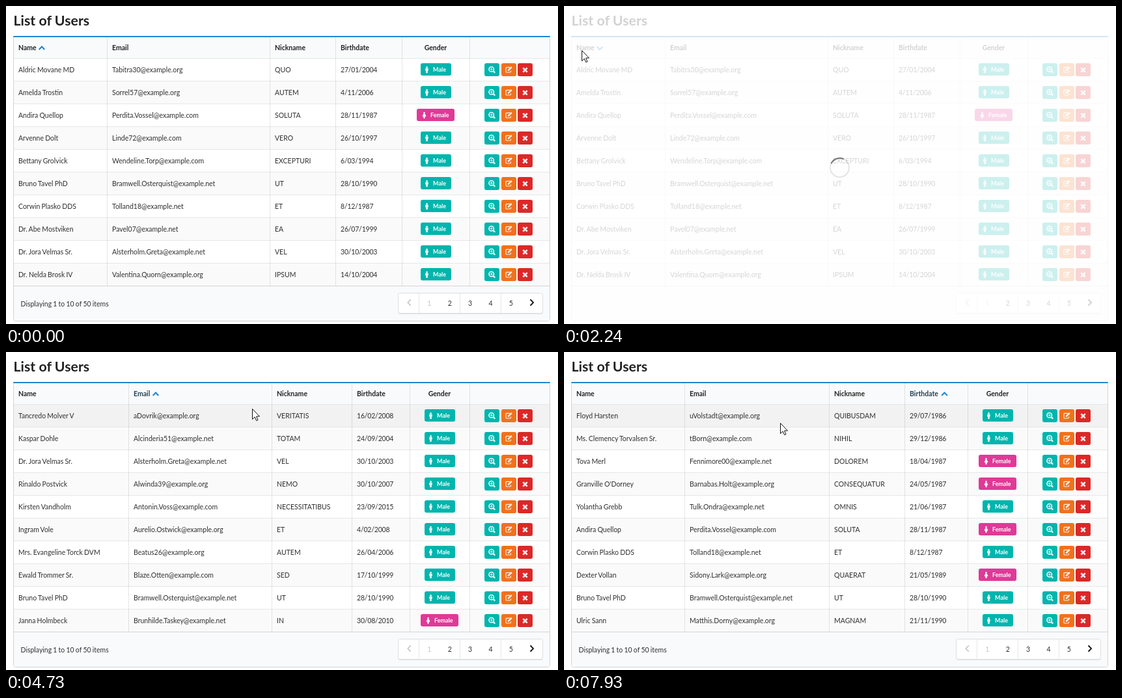
An HTML page that plays this animation: 848x489 px, repeating every 8000 ms.

```html
<!DOCTYPE html>
<html lang="en">
<head>
<meta charset="utf-8">
<title>List of Users</title>
<style>
html, body { margin: 0; width: 100%; height: 100%; overflow: hidden; background: #fff; }
svg { display: block; }
text { font: 10.5px Lato, sans-serif; fill: #303030; word-spacing: -.5px; }
.b { font-weight: 700; fill: #222; }
.title { font-size: 21.3px; font-weight: 700; fill: #222; word-spacing: 0; }
.tag { font-size: 9px; font-weight: 700; fill: #fff; }
.date { letter-spacing: -.2px; }
.mid { text-anchor: middle; }
.line { fill: #222426; fill-opacity: .11; }
.icon { fill: none; stroke: #fff; stroke-opacity: .9; }
.body { fill: #fff; fill-opacity: .95; }
</style>
</head>
<body>
<svg width="848" height="489" viewBox="0 0 848 489">
  <g id="page"></g>
  <g id="loader">
    <rect width="848" height="489" fill="#fff" fill-opacity=".8"/>
    <g fill="none" stroke-width="2" transform="translate(423.5 248.5)">
      <circle r="14.5" stroke="#000" stroke-opacity=".1"/>
      <path id="arc" d="M-10.25-10.25A14.5 14.5 0 0 1 10.25-10.25" stroke="#767676"/>
    </g>
  </g>
  <path id="cursor" stroke="#111" stroke-linejoin="round"/>
</svg>
<script>
const $ = id => document.getElementById(id);
const LOOP = 8000;

// name | mailbox | nickname | birthdate | gender
const people = `Aldric Movane MD|Tabitra30@example.org|QUO|27/01/2004|M
Amelda Trostin|Sorrel57@example.org|AUTEM|4/11/2006|M
Andira Quellop|Perdita.Vossel@example.com|SOLUTA|28/11/1987|F
Arvenne Dolt|Linde72@example.com|VERO|26/10/1997|M
Bettany Grolvick|Wendeline.Torp@example.com|EXCEPTURI|6/03/1994|M
Bruno Tavel PhD|Bramwell.Osterquist@example.net|UT|28/10/1990|M
Corwin Plasko DDS|Tolland18@example.net|ET|8/12/1987|M
Dr. Abe Mostviken|Pavel07@example.net|EA|26/07/1999|M
Dr. Jora Velmas Sr.|Alsterholm.Greta@example.net|VEL|30/10/2003|M
Dr. Nelda Brosk IV|Valentina.Quorn@example.org|IPSUM|14/10/2004|M
Zebulon Varn|Thomasetta76@example.org|ODIT|10/08/1993|M
Yolantha Grebb|Tulk.Ondra@example.net|OMNIS|21/06/1987|M
Volker Brandosk|Mirko.Tvelan@example.net|CORRUPTI|10/01/2002|M
Viola Torben|oVandermol@example.net|QUAERAT|8/09/2004|F
Ulric Sann|Matthis.Dorny@example.org|MAGNAM|21/11/1990|M
Tancredo Molver V|aDovrik@example.org|VERITATIS|16/02/2008|M
Rinaldo Postvick|Alwinda39@example.org|NEMO|30/10/2007|M
Remington Vollstad|Philippa93@example.com|EST|26/02/2013|F
Prof. Norbert Quimms|kVossenbrink@example.net|FACILIS|10/02/2011|M
Prof. Irena Dolsk IV|mGarrowe@example.org|QUAM|3/08/2002|F
Kaspar Dohle|Alcinderia51@example.net|TOTAM|24/09/2004|M
Kirsten Vandholm|Antonin.Voss@example.com|NECESSITATIBUS|23/09/2015|M
Ingram Vole|Aurelio.Ostwick@example.org|ET|4/02/2008|M
Mrs. Evangeline Torck DVM|Beatus26@example.org|AUTEM|26/04/2006|M
Ewald Trommer Sr.|Blaze.Otten@example.com|SED|17/10/1999|M
Janna Holmbeck|Brunhilde.Taskey@example.net|IN|30/08/2010|F
Floyd Harsten|uVolstadt@example.org|QUIBUSDAM|29/07/1986|M
Ms. Clemency Torvalsen Sr.|tBorn@example.com|NIHIL|29/12/1986|M
Tova Merl|Fennimore00@example.net|DOLOREM|18/04/1987|F
Granville O'Dorney|Barnabas.Holt@example.org|CONSEQUATUR|24/05/1987|F
Dexter Vollan|Sidony.Lark@example.org|QUAERAT|21/05/1989|F`.split('\n').map(s => s.split('|'));

// column edges and people shown, per result page
const tables = [
  { cols: [11, 155, 405, 506, 608, 712], rows: [0, 1, 2, 3, 4, 5, 6, 7, 8, 9] },
  { cols: [11, 178, 392, 494, 602, 712], rows: [10, 11, 12, 13, 14, 15, 16, 17, 18, 19] },
  { cols: [11, 188, 408, 531, 620, 712], rows: [15, 20, 8, 16, 21, 22, 23, 24, 5, 25] },
  { cols: [11, 185, 407, 523, 620, 712], rows: [26, 27, 28, 29, 11, 2, 6, 30, 5, 14] },
];
const heads = ['Name', 'Email', 'Nickname', 'Birthdate'];
const chevronX = [36, 34, 0, 53.5];
const sorts = [[0, 1], [0, -1], [1, 1], [3, 1]];  // column, direction

// each click: hand appears, loading starts, rows arrive, pointer leaves
const clicks = [[1320, 1710, 2400, 2710], [3510, 3890, 4040, 4590], [5350, 5900, 6430, 6590]];

// start, end, steps, then [progress, x, y]
const moves = [
  [470, 1260, 11, [.09, 190, 432], [.5, 112, 262], [1, 32, 86]],
  [1320, 1470, 3, [0, 32, 86], [1, 27, 68]],
  [2710, 3510, 11, [0, 27, 68], [.27, 123, 85], [.6, 190, 88], [1, 214, 66]],
  [3590, 3590, 1, [0, 214, 66], [1, 208, 62]],
  [4590, 5350, 11, [0, 208, 62], [.27, 377, 87], [.65, 545, 84], [1, 572, 62]],
  [6590, 7290, 10, [0, 572, 62], [.5, 735, 100], [1, 786, 124]],
  [7460, 7930, 7, [0, 786, 124], [1, 332, 109]],
];

const cursors = {
  arrow: ['M.5.5V16.5L4.2 13L6.7 18.5L9 17.5L6.6 12H11.5Z', '#fff'],
  hand: ['M-2 14V2Q-2 0 0 0T2 2V8Q4 6.5 5.5 8.5Q7.5 7.5 8.5 9.5Q11 9 11 12V16Q11 18 9 20V23H-1V21Q-4 17-6 14Q-7 11-5 11Q-3.5 11-2 14ZM2 8V12M5.5 8.5V12M8.5 9.5V12', '#fff'],
  beam: ['M-2.5-6.5H-1Q.5-6.5.5-5Q.5-6.5 2-6.5H3.5M.5-5V7M-2.5 8.5H-1Q.5 8.5.5 7Q.5 8.5 2 8.5H3.5', 'none'],
};

const text = (x, y, s, cls = '', fill = '') =>
  `<text x="${x}" y="${y}" class="${cls}" ${fill && `style="fill:${fill}"`}>${s}</text>`;
const rect = (x, y, w, h, fill, r = 0) =>
  `<rect x="${x}" y="${y}" width="${w}" height="${h}" rx="${r}" fill="${fill}"/>`;
const line = (x, y, w, h) => `<rect class="line" x="${x}" y="${y}" width="${w}" height="${h}"/>`;
const stroke = (d, width, color) =>
  `<path d="${d}" fill="none" stroke="${color}" stroke-width="${width}"/>`;
const at = (x, y, s) => `<g transform="translate(${x} ${y})">${s}</g>`;

function badge(cx, y, female) {
  const w = female ? 58 : 47, x = Math.floor(cx - w / 2 + .5), pad = female ? 21 : 19;
  const body = female ? 'M-1.2-2.3H1.2L3 1.2L1.6 2V3H1V5H-1V3H-1.6V2L-3 1.2Z' : 'M-2.2-2.3H2.2V1.4H1.3V5H-1.3V1.4H-2.2Z';
  return rect(x, y - 10, w, 19, female ? '#e03997' : '#00b5ad', 3) +
    at(x + pad - 9.5, y, `<circle class="body" cy="-3.7" r="1.4"/><path class="body" d="${body}"/>`) +
    text(x + pad, y + 3, female ? 'Female' : 'Male', 'tag');
}

function buttons(y) {
  const icons = [
    [735, '#00b5ad', '<g class="icon"><circle cx="-.8" cy="-.8" r="3.7" stroke-width="1.7"/><path d="M1.9 1.9L4.7 4.7" stroke-width="2.2"/><path d="M-2.8-.8H1.2M-.8-2.8V1.2" stroke-width="1.1"/></g>'],
    [761, '#f2711c', '<g class="icon"><path d="M1.8-3.6H-3.4Q-4.6-3.6-4.6-2.4V2.8Q-4.6 4-3.4 4H1.8Q3 4 3 2.8V1.6" stroke-width="1.2"/><path d="M-1.3 1.3L4.3-4.1" stroke-width="2.4"/></g>'],
    [786, '#db2828', '<path class="icon" d="M-3.2-2.8L3.2 3.6M3.2-2.8L-3.2 3.6" stroke-width="2.6"/>'],
  ];
  return icons.map(([x, c, s]) => rect(x, y - 10, 23, 20, c, 3) + at(x + 11.5, y, s)).join('');
}

function pager() {
  let s = rect(602.5, 442.5, 222, 31.5, '#2224261c', 3) +
    '<rect x="602.5" y="441.5" width="222" height="31" rx="3" fill="#fff" stroke="#dededf"/>';
  for (const x of [634, 697, 760]) s += line(x, 442, 1, 30);
  for (let i = 0; i < 5; i++)
    s += text(650.3 + i * 31.4, 461, i + 1, 'mid', i ? '' : '#c4c4be');
  return s + stroke('M621.8 451.3L617.3 456L621.8 460.7', 1.8, '#c9c9c9') +
    stroke('M805.5 451.3L810 456L805.5 460.7', 2, '#222');
}

function page({ table, sort, loading, row, mode }) {
  const { cols, rows } = tables[table], [sortCol, dir] = sorts[sort];
  const mid = (cols[4] + cols[5]) / 2;
  let s = text(11.5, 30, 'List of Users', 'title') +
    '<rect x="11.5" y="46.5" width="824" height="438" rx="3" fill="#fff" stroke="#d4d4d5"/>' +
    rect(12, 48, 823, 32, '#f9fafb') + rect(12, 430, 823, 54, '#f9fafb', 2) +
    rect(11, 46, 825, 2, '#2185d0', 1);
  rows.forEach((id, i) => {
    const y = 81 + i * 35, who = people[id];
    if (i === row) s += rect(12, y, 823, 34, '#f2f2f2');
    else if (i % 2) s += rect(12, y, 823, 34, '#fafafb');
    for (let c = 0; c < 4; c++) s += text(cols[c] + 8, y + 21, who[c], c === 3 ? 'date' : '');
    s += badge(mid, y + 17, who[4] === 'F') + buttons(y + 17);
  });
  for (let i = 0; i < 10; i++) s += line(12, 80 + i * 35, 823, 1);
  s += rect(12, 430, 823, 1, '#d4d4d5');
  for (const x of cols.slice(1)) s += line(x, 48, 1, 382);
  const target = mode === 'hand' ? sorts[sort + 1][0] : -1;
  heads.forEach((h, c) => {
    const active = c === sortCol && table && mode !== 'beam';
    s += text(cols[c] + 8, 68, h, 'b', c === target ? '#4183c4' : active ? '#243f50' : '');
  });
  const cx = cols[sortCol] + 8 + chevronX[sortCol];
  s += stroke(`M${cx - 4.3} ${64.7 + dir * 2.2}L${cx} ${64.7 - dir * 2.2}L${cx + 4.3} ${64.7 + dir * 2.2}`, 2.1, '#2185d0');
  s += text(mid, 68, 'Gender', 'b mid');
  if (!loading) s += text(22.5, 461.5, 'Displaying 1 to 10 of 50 items');
  return s + pager();
}

function pointer(t) {
  const move = moves.findLast(m => t >= m[0]);
  if (!move) return null;
  const [start, end, n, ...pts] = move;
  const step = Math.min(n - 1, Math.floor((t - start) / (end - start || 1) * (n - 1) + .2));
  const p = (step + 1) / n;
  const i = Math.max(1, pts.findIndex(q => q[0] >= p - 1e-6));
  const [a, b] = [pts[i - 1], pts[i]], f = Math.max(0, (p - a[0]) / (b[0] - a[0]));
  return [1, 2].map(k => Math.round(a[k] + (b[k] - a[k]) * f));
}

let shown;
function frame() {
  const t = performance.now() % LOOP;
  const pos = pointer(t);
  const load = clicks.find(c => t >= c[1] && t < c[2]);
  const mode = clicks.some(c => t >= c[0] && t < c[1]) ? 'hand'
    : clicks.some(c => t >= c[2] && t < c[3]) ? 'beam' : 'arrow';
  const state = {
    table: clicks.filter(c => t >= c[2]).length,
    sort: clicks.filter(c => t >= c[1]).length,
    loading: !!load,
    row: pos && !load && mode === 'arrow' ? Math.floor((pos[1] - 80) / 35) : -1,
    mode,
  };
  const key = JSON.stringify(state);
  if (key !== shown) $('page').innerHTML = page(state);
  shown = key;

  $('loader').style.display = load ? '' : 'none';
  if (load) $('arc').setAttribute('transform', `rotate(${25 + 45 * Math.floor((t - load[1]) / 75 + .2)})`);

  const cursor = $('cursor'), [d, fill] = cursors[mode];
  cursor.style.display = pos ? '' : 'none';
  if (pos) {
    cursor.setAttribute('d', d);
    cursor.setAttribute('fill', fill);
    cursor.setAttribute('transform', `translate(${pos})`);
  }
  requestAnimationFrame(frame);
}
frame();
</script>
</body>
</html>
```
